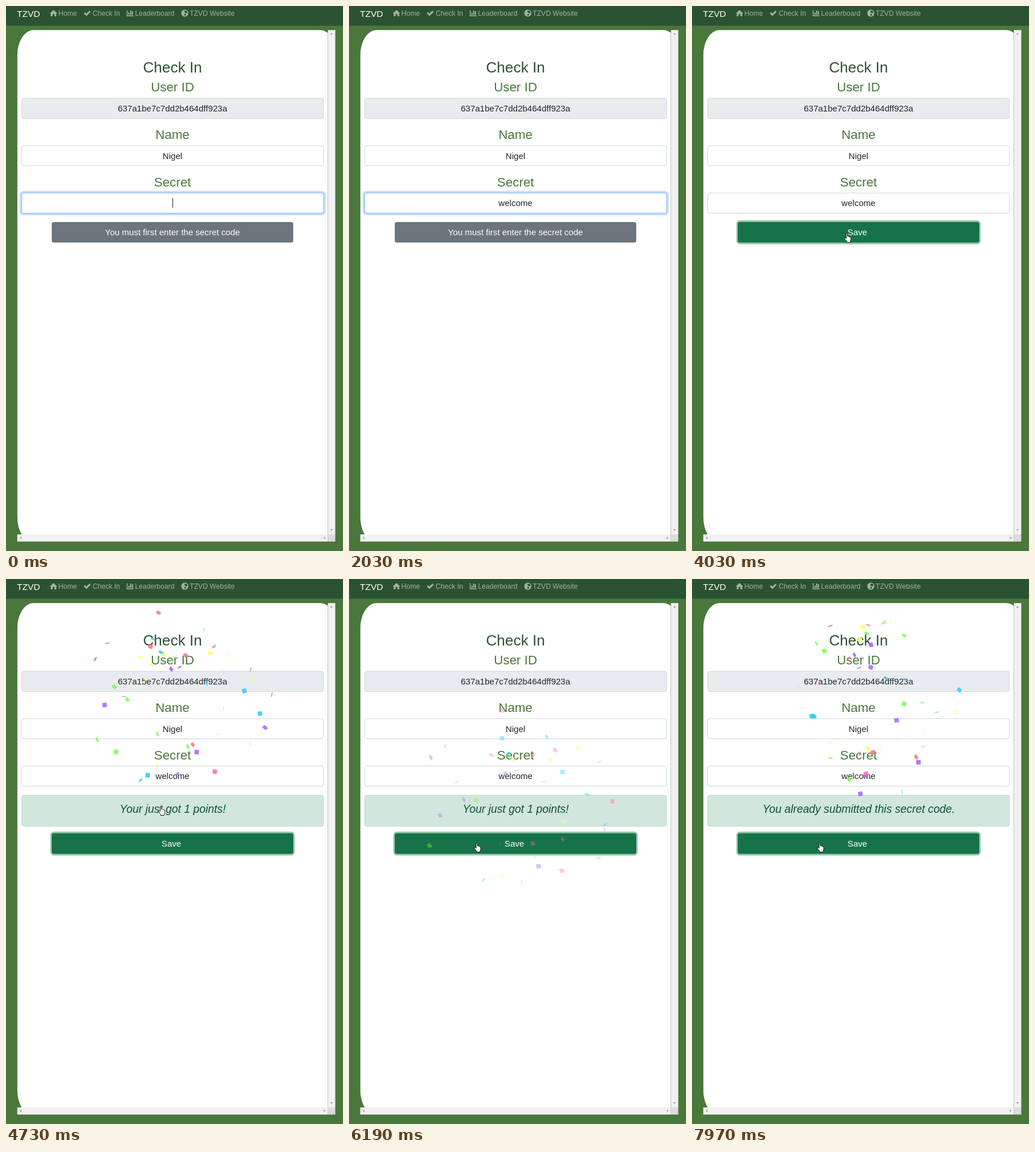
Write an HTML page with a canvas that moves like this. It is 589 by 951 pixels and loops after 8000 ms.

```html
<!DOCTYPE html>
<html lang="en">
<head>
<meta charset="utf-8">
<title>Check In</title>
<style>
  html, body { margin: 0; width: 100%; height: 100%; overflow: hidden; background: #4a773c; }
  canvas { display: block; }
</style>
</head>
<body>
<canvas id="stage" width="589" height="951"></canvas>
<script>
const ctx = document.getElementById('stage').getContext('2d');
const LOOP = 8000, MID = 291;
const DARK = '#2c5234', GREEN = '#4a773c', INK = '#212529', MUTED = 'rgba(255,255,255,.55)';
const SAVE_AT = 3400, FIRST = 4350, SECOND = 7590;

function text(str, x, y, size, color, align = 'center', style = '') {
  ctx.font = `${style} ${size}px "Liberation Sans", Arial, sans-serif`;
  ctx.textAlign = align;
  ctx.fillStyle = color;
  ctx.fillText(str, x, y);
}

function rect(x, y, w, h, color) {
  ctx.fillStyle = color;
  ctx.fillRect(x, y, w, h);
}

function box(x, y, w, h, fill, stroke, r = 3.5) {
  ctx.beginPath();
  ctx.roundRect(x, y, w, h, r);
  ctx.fillStyle = fill;
  ctx.fill();
  if (stroke) {
    ctx.lineWidth = 1;
    ctx.strokeStyle = stroke;
    ctx.stroke();
  }
}

function disc(x, y, r, color) {
  ctx.beginPath();
  ctx.arc(x, y, r, 0, 7);
  ctx.fillStyle = color;
  ctx.fill();
}

function shape(d, x, y, color) {
  ctx.save();
  ctx.translate(x, y);
  ctx.fillStyle = color;
  ctx.fill(new Path2D(d));
  ctx.restore();
}

// --- page ---

function nav() {
  rect(0, 0, 589, 34.5, DARK);
  text('TZVD', 19, 18.7, 15.5, '#fff', 'left');
  const link = (label, x) => text(label, x, 17.4, 12.15, MUTED, 'left');
  link('Home', 91.5);
  link('Check In', 151.4);
  link('Leaderboard', 225.4);
  link('TZVD Website', 321);

  shape('M0 6L6.5 0L13 6H11.3V11H8V7H5V11H1.7V6Z', 76.5, 7, MUTED);
  shape('M0 5L2.2 2.8L4.6 5.2L9.8 0L12 2.2L4.6 9.6Z', 136, 8, MUTED);
  shape('M0 0H1.5V9H12V10.5H0ZM3 8V4H5V8ZM6 8V.5H8V8ZM9 8V1.5H11V8Z', 211, 7.5, MUTED);
  disc(312.5, 12.5, 6.2, MUTED);
  shape('M0 0L4.5 1L5 4L2 4.5L0 3ZM0 5.5L3 6L1.5 9H0Z', 312, 8, DARK);
}

function card() {
  ctx.save();
  ctx.beginPath();
  ctx.rect(19.5, 42, 543, 880);
  ctx.clip();
  ctx.beginPath();
  ctx.roundRect(19.7, 42, 558, 894, { x: 28, y: 44.7 });
  ctx.fillStyle = '#fff';
  ctx.fill();
  ctx.restore();

  rect(562.7, 42, 12.8, 880, '#f1f1f1');
  rect(19.7, 922, 543, 12.5, '#f1f1f1');
  rect(562.7, 922, 12.8, 12.5, '#dcdcdc');
  const grey = '#a3a3a3';
  shape('M0 3L2.5 0L5 3Z', 566.5, 47, grey);
  shape('M0 0L2.5 3L5 0Z', 566.5, 913, grey);
  shape('M3 0L0 2.5L3 5Z', 24, 925.5, grey);
  shape('M0 0L3 2.5L0 5Z', 555.5, 925.5, grey);
}

function field(label, y, fill, stroke = '#ced4da') {
  text(label, MID, y - 11.3, 22.3, GREEN);
  box(27.5, y + .3, 527.5, 35.2, fill, stroke);
}

// --- secret typed in three bursts ---

function typedCount(t) {
  if (t < 800) return 0;
  if (t < 1080) return Math.min(3, 1 + Math.floor((t - 800) / 65));
  if (t < 1480) return Math.min(6, 4 + Math.floor((t - 1080) / 75));
  return 7;
}

function secret(t) {
  const focused = t < SAVE_AT;
  if (focused) box(24, 322.7, 534.5, 42.4, '#c2dbfe', null, 6);
  field('Secret', 326, '#fff', focused ? '#86b7fe' : '#ced4da');
  const typed = 'welcome'.slice(0, typedCount(t));
  text(typed, MID, 349, 15.04, INK);
  const caret = t < 230 || (t >= 800 && t < 2030) || (t >= 2560 && t < 3090);
  if (focused && caret) rect(Math.round(MID + ctx.measureText(typed).width / 2 - .4), 335, 1, 17, INK);
}

function button(t) {
  if (t < SAVE_AT) {
    box(80, 377, 422, 35.7, '#6c757d');
    text('You must first enter the secret code', MID, 400, 15.04, '#fff');
    return;
  }
  const y = t < FIRST ? 377 : 443.8;
  box(77.5, y - 3, 427, 41.7, '#97c5ae', null, 6);
  box(80, y, 422, 35.7, '#157347');
  text('Save', 289, y + 23, 15.04, '#fff');
}

function notice(t) {
  if (t < FIRST) return;
  box(27.5, 377.3, 527.5, 54, '#d1e7dd', '#badbcc');
  const message = t < SECOND ? 'Your just got 1 points!' : 'You already submitted this secret code.';
  text(message, MID + .4, 407.7, 19.3, '#0f5132', 'center', 'italic');
}

// --- confetti: radial launch with drag, steady fall, wobble and tilt ---

const COLORS = ['#a864fd', '#29cdff', '#78ff44', '#ff718d', '#fdff6a'];
const PIECES = 45, SIZE = 7.8, SPEED = 14, DRAG = .12, FALL = 2.05, WOBBLE = 7.6;

function seeded(seed) {
  return () => {
    seed = (seed * 16807) % 2147483647;
    return seed / 2147483647;
  };
}

function confetti(age, seed) {
  if (age < 0 || age > 3000) return;
  const rand = seeded(seed);
  const n = age * .06;
  const reach = (1 - (1 - DRAG) ** n) / DRAG;
  ctx.globalAlpha = 1 - age / 3000;
  for (let i = 0; i < PIECES; i++) {
    const angle = rand() * 2 * Math.PI;
    const r = SPEED * (.5 + rand()) * reach;
    const wobble = rand() * 10 + (.1 + rand() * .1) * n;
    const tilt = rand() * Math.PI + (.1 + rand() * .3) * n;
    // rotation about the (1, 1, 1) axis, seen from the front
    const c = Math.cos(tilt), k = Math.sin(tilt) / Math.sqrt(3), m = (1 - c) / 3;
    ctx.save();
    ctx.translate(298 + r * Math.cos(angle) + WOBBLE * Math.cos(wobble),
      170 + r * Math.sin(angle) + FALL * n + WOBBLE * Math.sin(wobble));
    ctx.transform(m + c, m + k, m - k, m + c, 0, 0);
    rect(-SIZE / 2, -SIZE / 2, SIZE, SIZE, COLORS[i % COLORS.length]);
    ctx.restore();
  }
  ctx.globalAlpha = 1;
}

// --- pointer ---

const HAND = new Path2D('M3.6 9.5V1.9Q3.6 .6 4.7 .6T5.8 1.9V5.6Q7.4 4.9 7.8 6.2Q9.3 5.6 9.7 6.9' +
  'Q11.6 6.5 11.6 8.4V11.5Q11.6 13.5 10.4 14.8V16.5H4.6V15Q2.6 12.9 .8 10.2Q.3 8.6 1.8 8.5Q2.7 8.6 3.6 9.5Z');

const progress = (t, from, to) => Math.min(1, Math.max(0, (t - from) / (to - from)));

function pointer(t) {
  if (t < 2870) return;
  const arrive = progress(t, 2870, 4030), drop = progress(t, 5000, 5400);
  const x = 564 - 298 * arrive - 47.5 * drop;
  const y = 396 + 47 * (1 - arrive) ** 3 + 64 * drop;
  if (t >= 6960 && t < 7200) disc(x + 4, y, 9.3, 'rgba(255,235,0,.55)');
  ctx.save();
  ctx.translate(x, y);
  ctx.fillStyle = '#fff';
  ctx.fill(HAND);
  ctx.lineWidth = 1;
  ctx.strokeStyle = '#111';
  ctx.stroke(HAND);
  ctx.restore();
}

function draw(now) {
  const t = now % LOOP;
  rect(0, 0, 589, 951, GREEN);
  nav();
  card();
  text('Check In', MID, 115.7, 26.1, DARK);
  field('User ID', 160.7, '#e9ecef');
  text('637a1be7c7dd2b464dff923a', MID, 184, 15.04, INK);
  field('Name', 243.3, '#fff');
  text('Nigel', MID, 266.5, 15.04, INK);
  secret(t);
  notice(t);
  button(t);
  confetti(t - FIRST, 90210);
  confetti(t - SECOND, 777123);
  pointer(t);
}

const start = performance.now();
function tick(now) {
  draw(Math.max(0, now - start));
  requestAnimationFrame(tick);
}
draw(0);
requestAnimationFrame(tick);
</script>
</body>
</html>
```
